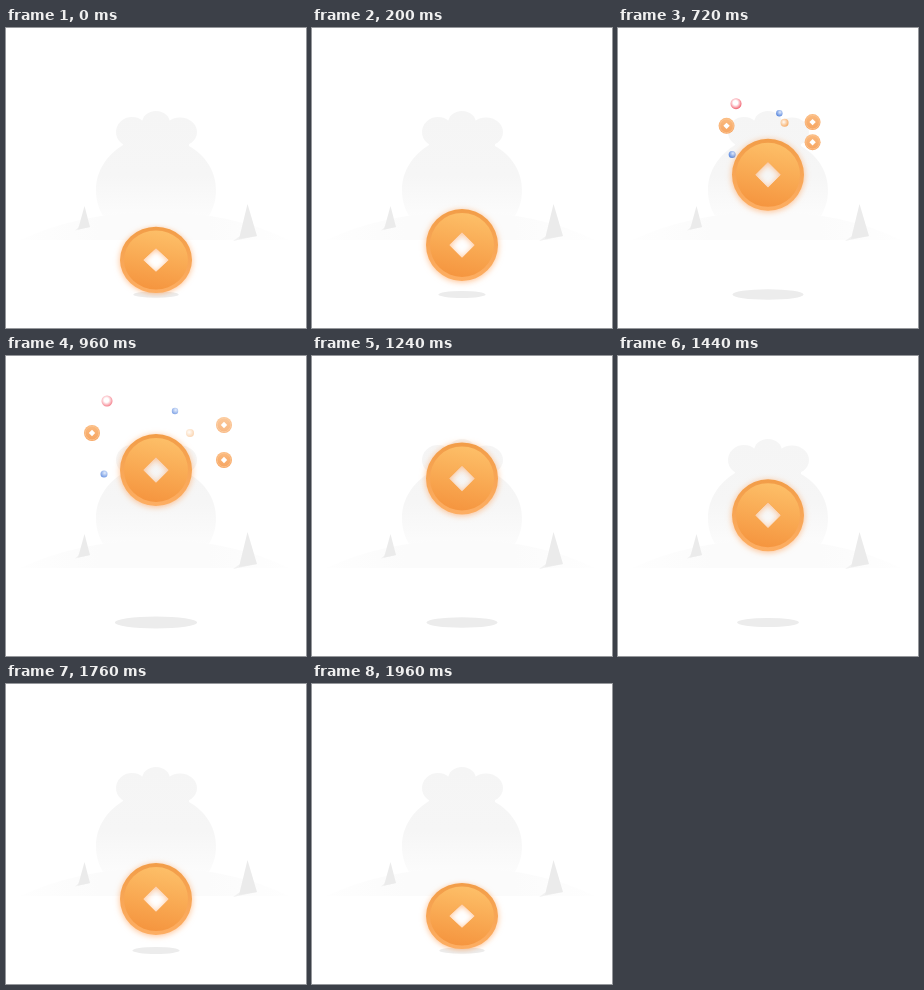
An HTML page that plays this animation: 300x300 px, repeating every 2 s.

```html
<!DOCTYPE html>
<html lang="en">
<head>
<meta charset="utf-8">
<title>Bouncing coin</title>
<style>
html, body { margin: 0; width: 100%; height: 100%; overflow: hidden; background: #fff; }
svg { display: block; width: 100%; height: 100%; }
#disc { filter: drop-shadow(0 1.5px 3px rgba(255, 140, 50, .55)); }
</style>
</head>
<body>
<svg viewBox="0 0 300 300">
  <defs>
    <linearGradient id="bag" gradientUnits="userSpaceOnUse" x1="0" y1="83" x2="0" y2="190">
      <stop offset="0" stop-color="#f5f5f5"/>
      <stop offset=".6" stop-color="#f6f6f6"/>
      <stop offset="1" stop-color="#fcfcfc"/>
    </linearGradient>
    <linearGradient id="hill">
      <stop offset="0" stop-color="#fefefe"/>
      <stop offset=".3" stop-color="#fbfbfb"/>
      <stop offset=".7" stop-color="#fbfbfb"/>
      <stop offset="1" stop-color="#fefefe"/>
    </linearGradient>
    <linearGradient id="rim" x2="0" y2="1">
      <stop offset="0" stop-color="#f29d48"/>
      <stop offset="1" stop-color="#fdae63"/>
    </linearGradient>
    <linearGradient id="face" x1=".6" x2=".4" y2="1">
      <stop offset="0" stop-color="#fdbf68"/>
      <stop offset="1" stop-color="#f5953f"/>
    </linearGradient>
    <linearGradient id="chip" x2="0" y2="1">
      <stop offset="0" stop-color="#fbbb80"/>
      <stop offset="1" stop-color="#f6a461"/>
    </linearGradient>
    <radialGradient id="red" cx=".45" cy=".42" r=".58">
      <stop offset=".35" stop-color="#fff"/>
      <stop offset=".65" stop-color="#fbb9c0"/>
      <stop offset="1" stop-color="#f0606f"/>
    </radialGradient>
    <radialGradient id="blue" cx=".6" cy=".35" r=".7">
      <stop offset="0" stop-color="#dfeafc"/>
      <stop offset="1" stop-color="#4f80dc"/>
    </radialGradient>
    <radialGradient id="peach" cx=".4" cy=".4" r=".65">
      <stop offset=".1" stop-color="#fff3e6"/>
      <stop offset="1" stop-color="#f5a860"/>
    </radialGradient>
  </defs>

  <g fill="url(#bag)">
    <ellipse cx="126" cy="104" rx="16" ry="15"/>
    <ellipse cx="150" cy="95" rx="14" ry="12"/>
    <ellipse cx="174" cy="104" rx="17" ry="14.5"/>
    <path d="M117 101H183V118C199 127 210 143 210 162C210 173 207 181 203 188H97C93 181 90 173 90 162C90 143 101 127 117 117Z"/>
  </g>
  <path d="M14 212Q75 184 150 184T283 212Z" fill="url(#hill)"/>
  <path d="M69 202.500L73 199L84 199Z" fill="#f1f1f1"/>
  <path d="M78.500 178L84 199L72 201.500Z" fill="#ebebeb"/>
  <path d="M227 213L234 208L251 208Z" fill="#f1f1f1"/>
  <path d="M241.500 176L251 208L233 211Z" fill="#ebebeb"/>

  <ellipse id="shadow" fill="#ececec" cx="150" cy="266.500"/>
  <g id="bits"></g>
  <g id="coin">
    <g id="disc" fill-rule="evenodd">
      <path fill="url(#rim)" d="M-36 0A36 36 0 1 1 36 0A36 36 0 1 1-36 0ZM0-13L13 0L0 13L-13 0Z"/>
      <path fill="url(#face)" d="M-32 0A32 32 0 1 1 32 0A32 32 0 1 1-32 0ZM0-13L13 0L0 13L-13 0Z"/>
    </g>
  </g>
</svg>
<script>
const LOOP = 2000;
const $ = id => document.getElementById(id);
const clamp = (v, lo = 0, hi = 1) => Math.min(hi, Math.max(lo, v));

// time, coin centre y
const path = [
  [0, 232], [200, 217], [520, 180], [960, 114], [1090, 108.5],
  [1440, 159], [1680, 207], [1760, 215], [1960, 232], [2000, 232]
];

// kind, radius, burst x and y, resting x and y, time faded out
const bits = [
  ['chip', 8, 139, 126, 86, 77, 1190],
  ['chip', 8, 163, 128, 218, 69, 1120],
  ['chip', 8, 163, 128, 218, 104, 1190],
  ['peach', 4, 143, 119, 184, 77, 1060],
  ['red', 5.5, 141, 117, 101, 45, 1120],
  ['blue', 3.2, 151, 126, 169, 55, 1110],
  ['blue', 3.5, 136, 138, 98, 118, 1130]
].map(([kind, r, x0, y0, x1, y1, gone]) => {
  const node = document.createElementNS('http://www.w3.org/2000/svg', 'g');
  node.innerHTML = `<circle r="${r}" fill="url(#${kind})"/>` + (kind === 'chip'
    ? '<circle r="6.8" fill="none" stroke="#fcc796" stroke-width=".7"/><path d="M0-3.200L3.200 0L0 3.200L-3.200 0Z" fill="#fff"/>'
    : '');
  $('bits').append(node);
  return { node, x0, y0, x1, y1, gone };
});

const slope = i => (path[i + 1][1] - path[i][1]) / (path[i + 1][0] - path[i][0]);

// Tangent that never overshoots its neighbours
function tangent(i) {
  if (i === 0) return slope(0);
  if (i === path.length - 1) return 0;
  const a = slope(i - 1), b = slope(i);
  return a * b > 0 ? 2 * a * b / (a + b) : 0;
}

function coinY(t) {
  let i = 0;
  while (i < path.length - 2 && t >= path[i + 1][0]) i++;
  const [ta, ya] = path[i], [tb, yb] = path[i + 1];
  const d = tb - ta, u = (t - ta) / d, v = 1 - u;
  return ya * (1 + 2 * u) * v * v + tangent(i) * d * u * v * v
    + yb * u * u * (3 - 2 * u) - tangent(i + 1) * d * u * u * v;
}

function draw(t) {
  const fromEnd = t < 1000 ? t : Math.max(0, 1960 - t);
  const squash = 0.92 + 0.08 * clamp(fromEnd / 140);
  $('coin').setAttribute('transform', `translate(150 ${coinY(t)}) scale(1 ${squash})`);

  const rx = 22.7 + 0.023 * clamp(fromEnd - 160, 0, 820);
  $('shadow').setAttribute('rx', rx);
  $('shadow').setAttribute('ry', rx * 0.145);

  const left = Math.pow(clamp((960 - t) / 440, 0, 1.2), 1.4);
  for (const b of bits) {
    const x = b.x1 + (b.x0 - b.x1) * left;
    const y = b.y1 + (b.y0 - b.y1) * left;
    b.node.setAttribute('transform', `translate(${x} ${y})`);
    b.node.setAttribute('opacity', clamp(Math.min((t - 440) / 160, (b.gone - t) / 200)));
  }
}

const start = performance.now();
function tick() {
  draw((performance.now() - start) % LOOP);
  requestAnimationFrame(tick);
}
tick();
</script>
</body>
</html>
```
